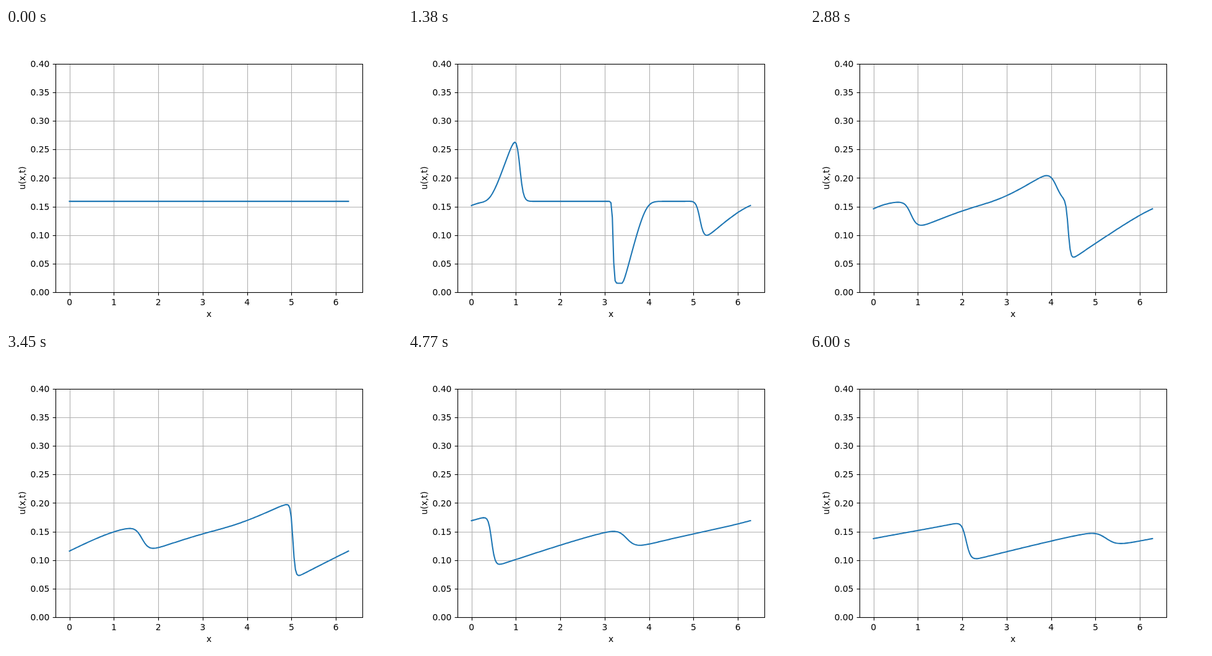
An HTML page with a canvas that plays this animation: 640 by 480 pixels, repeating every 6.03 s.

```html
<!DOCTYPE html>
<html lang="en">
<head>
<meta charset="utf-8">
<title>u(x,t)</title>
<style>
  html, body { margin: 0; width: 100%; height: 100%; overflow: hidden; background: #fff; }
  canvas { display: block; width: 640px; height: 480px; }
</style>
</head>
<body>
<canvas id="plot" width="640" height="480"></canvas>
<script>
const ctx = document.getElementById('plot').getContext('2d');

// Timing
const FRAME_MS = 30, FRAMES = 201;

// Periodic advection u_t + u u_x = 0, first-order upwind
const N = 200, DX = 2 * Math.PI / N;
const SUBSTEPS = 10, DT = 0.031;
const REST = 1 / (2 * Math.PI), LOW = 0.1 * REST, HIGH = 1.9 * REST;
const KICK_NODES = 12;
const KICKS = [
  { step: 15, node: 114, value: LOW },
  { step: 45, node: 109, value: HIGH },
  { step: 351, node: 0, value: HIGH },
  { step: 367, node: 97, value: LOW }
];

function advance(u) {
  return u.map((v, i) => v - v * DT / DX * (v - u[(i + N - 1) % N]));
}

function simulate() {
  let u = new Float64Array(N).fill(REST);
  const states = [u];
  for (let step = 1; step <= (FRAMES - 1) * SUBSTEPS; step++) {
    u = advance(u);
    for (const k of KICKS) {
      if (k.step === step) u.fill(k.value, k.node, k.node + KICK_NODES);
    }
    if (step % SUBSTEPS === 0) states.push(u);
  }
  return states;
}

// Axes geometry
const LEFT = 80, RIGHT = 576, TOP = 57.6, BOTTOM = 427.2;
const MARGIN = Math.PI / 10;
const X_SCALE = (RIGHT - LEFT) / (2 * Math.PI + 2 * MARGIN);
const px = x => LEFT + (x + MARGIN) * X_SCALE;
const py = u => BOTTOM - u / 0.4 * (BOTTOM - TOP);
const snap = v => Math.floor(v + 0.5) + 0.5;

function segment(x1, y1, x2, y2, color) {
  ctx.strokeStyle = color;
  ctx.beginPath();
  ctx.moveTo(x1, y1);
  ctx.lineTo(x2, y2);
  ctx.stroke();
}

function label(text, x, y, align) {
  ctx.textAlign = align;
  ctx.fillText(text, x, y);
}

function drawGrid() {
  const l = snap(LEFT), r = snap(RIGHT), t = snap(TOP), b = snap(BOTTOM);
  ctx.lineWidth = 1.11;
  ctx.lineCap = 'butt';
  ctx.fillStyle = '#000';
  for (let i = 0; i <= 6; i++) {
    const x = snap(px(i));
    segment(x, t, x, b, '#b0b0b0');
    segment(x, b, x, b + 4.86, '#000');
    label(String(i), px(i), 448, 'center');
  }
  for (let i = 0; i <= 8; i++) {
    const u = i * 0.05, y = snap(py(u));
    segment(l, y, r, y, '#b0b0b0');
    segment(l - 4.86, y, l, y, '#000');
    label(u.toFixed(2), 70.3, Math.round(py(u) + 5.2), 'right');
  }
}

function drawCurve(u) {
  ctx.strokeStyle = '#1f77b4';
  ctx.lineWidth = 2.083;
  ctx.lineCap = 'square';
  ctx.lineJoin = 'round';
  ctx.beginPath();
  for (let i = 0; i <= N; i++) ctx.lineTo(px(i * DX), py(u[i % N]));
  ctx.stroke();
}

function drawFrame() {
  const l = snap(LEFT), t = snap(TOP);
  ctx.strokeStyle = '#000';
  ctx.lineWidth = 1.11;
  ctx.lineJoin = 'miter';
  ctx.strokeRect(l, t, snap(RIGHT) - l, snap(BOTTOM) - t);
  label('x', 328, 467, 'center');
  ctx.save();
  ctx.translate(31, 242.4);
  ctx.rotate(-Math.PI / 2);
  label('u(x,t)', 0, 0, 'center');
  ctx.restore();
}

function draw(u) {
  ctx.fillStyle = '#fff';
  ctx.fillRect(0, 0, 640, 480);
  ctx.font = '13.89px "DejaVu Sans", sans-serif';
  drawGrid();
  drawCurve(u);
  drawFrame();
}

const states = simulate();
const start = performance.now();

function tick() {
  const elapsed = Math.max(0, performance.now() - start);
  draw(states[Math.floor(elapsed / FRAME_MS) % FRAMES]);
  requestAnimationFrame(tick);
}
tick();
</script>
</body>
</html>
```
